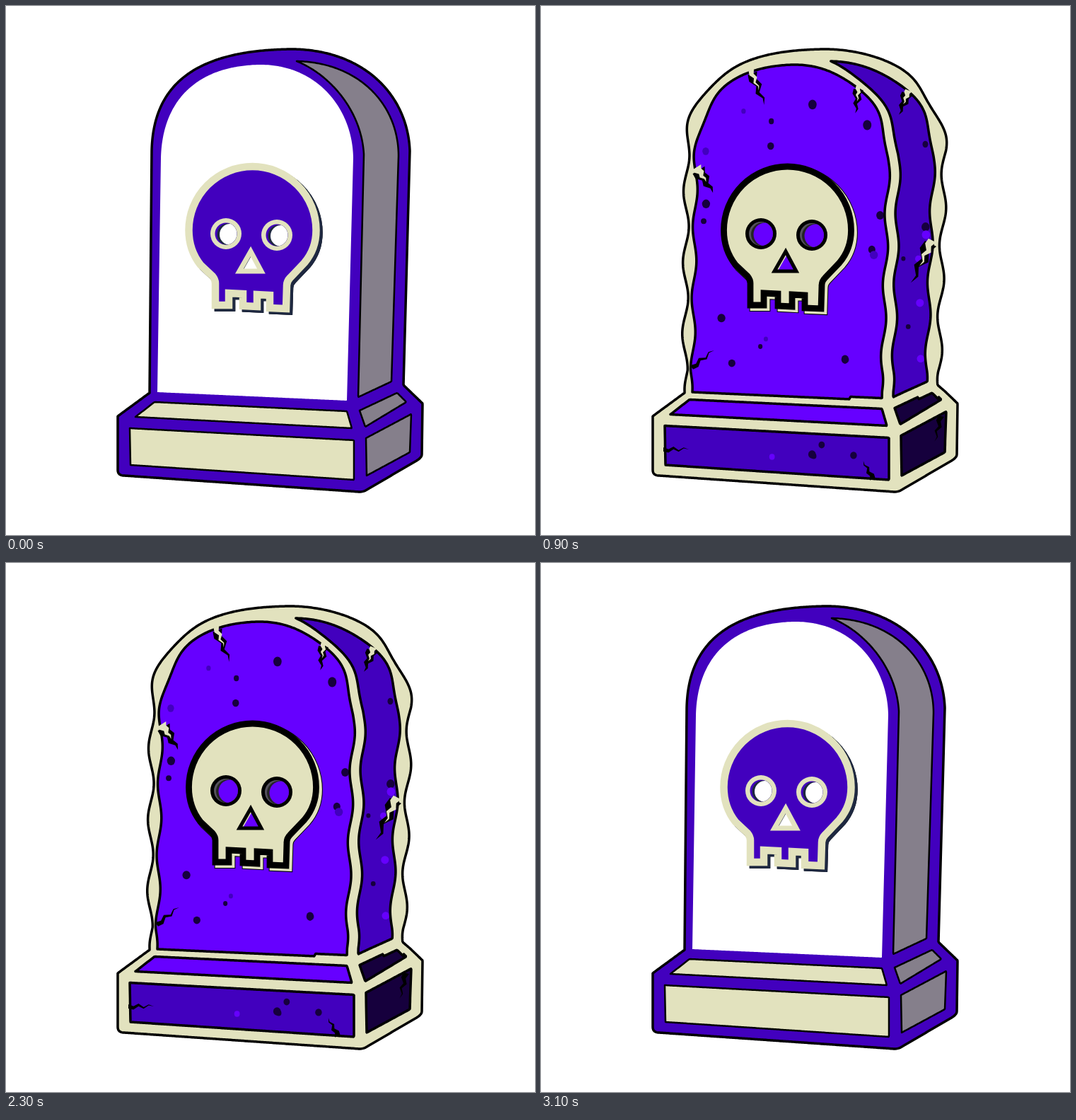
An HTML page with a canvas for the animation above (3.2 s loop, 748 by 748 pixels).

```html
<!DOCTYPE html>
<html lang="en">
<head>
<meta charset="utf-8">
<title>Tombstone</title>
<style>
  html, body { margin: 0; width: 100%; height: 100%; overflow: hidden; background: #fff; }
  canvas { display: block; width: 100vmin; height: 100vmin; }
</style>
</head>
<body>
<canvas id="stage" width="748" height="748"></canvas>
<script>
const ctx = document.getElementById('stage').getContext('2d');
const VIOLET = '#6600ff', BLUE = '#4200be', NIGHT = '#16003d', CREAM = '#e2e2be', GREY = '#857f8b';

// Four key poses (fresh, dull, cracked, mossy) and the steps at which they are reached.
const KEYS = [0, 3, 8, 13];
let pose = 0, part = 0, grown = 0, late = 0;

const lerp = (a, b) => a + (b - a) * part;
const mix = (...v) => lerp(v[pose], v[pose + 1]);
const channels = hex => [1, 3, 5].map(i => parseInt(hex.slice(i, i + 2), 16));
function tint(...v) {
  const to = channels(v[pose + 1]);
  return `rgb(${channels(v[pose]).map((c, i) => Math.round(lerp(c, to[i])))})`;
}

let seed = 11;
const random = (from, to) => {
  seed = seed * 16807 % 2147483647;
  return from + (to - from) * seed / 2147483647;
};

// Closely spaced points along a path, so that it can be warped.
function sample(d) {
  const path = document.createElementNS('http://www.w3.org/2000/svg', 'path');
  path.setAttribute('d', d);
  const length = path.getTotalLength();
  return Array.from({ length: Math.round(length / 2) }, (_, i) => path.getPointAtLength(i * 2));
}

const body = sample('M203 547L206 205C208 112 266 62 405 61C505 62 568 125 571 205L562 536L589 562L588 634Q588 638 582 642L512 683Q506 687 500 687L167 664Q158 664 158 656V580Z');

// Weathering: the walls of the stone become wavy, the panels against the rim.
const wave = (x, y, size) =>
  size * grown * Math.cos((y + 0.07 * x - 427) / 16) * Math.max(0, Math.min(1, (545 - y) / 30));
const bite = (x, y, bx, by, depth) =>
  depth * late * Math.exp(-((x - bx) ** 2 + (y - by) ** 2) / 70);
const rimWarp = ({ x, y }) =>
  [x + wave(x, y, 4) + bite(x, y, 208, 228, 8) + bite(x, y, 530, 112, -7), y];
const panelWarp = ({ x, y }) =>
  [x + wave(x, y, -3), y - (y > 556 && y < 620 ? 3.5 * grown : 0)];

function outline(points, warp) {
  const path = new Path2D();
  for (const p of points) path.lineTo(...warp(p));
  path.closePath();
  return path;
}
function paint(path, fill, stroke, width) {
  if (fill) { ctx.fillStyle = fill; ctx.fill(path); }
  if (width > 0.05) { ctx.strokeStyle = stroke; ctx.lineWidth = width; ctx.stroke(path); }
}
function oval(x, y, rx, ry, fill) {
  const path = new Path2D();
  path.ellipse(x, y, rx, ry, 0, 0, 7);
  paint(path, fill);
}
function inside(path, drawing) {
  ctx.save();
  ctx.clip(path);
  drawing();
  ctx.restore();
}

// Slime comes in from the top (side -1) or the bottom (side 1) with a wavy edge.
function slime(color, side, level, slope, height, length, crest) {
  const path = new Path2D(), shift = side * 90 * (1 - late);
  path.moveTo(150, 374 + side * 374);
  for (let x = 150; x <= 600; x += 3) {
    const ripple = Math.cos((x - crest) / length) + 0.3 * Math.sin(x / 7);
    path.lineTo(x, level + slope * (x - crest) - side * height * ripple + shift);
  }
  path.lineTo(600, 374 + side * 374);
  paint(path, color);
}

// Speckles keep clear of the skull.
function speckles(count, [left, top, width, height], colors, stretch) {
  const list = [];
  while (list.length < count) {
    const x = random(left, left + width), y = random(top, top + height), r = random(3, 6);
    if (Math.hypot(x - 349, y - 325) > 118) list.push([x, y, r, r * random(1, stretch), colors[list.length % colors.length]]);
  }
  return list;
}
function drawSpeckles(list, size) {
  if (size) for (const [x, y, rx, ry, color] of list) oval(x, y, rx * size, ry * size, color);
}

const panel = (d, colors, framed, spots, slimes = () => {}) => ({
  points: sample(d), colors, framed, slimes,
  dust: spots ? speckles(...spots, 1.2) : [],
  moss: spots ? speckles(...spots, 2.3) : []
});
const pale = [CREAM, '#a69abf'], dim = [GREY, '#7e7189'];
const panels = [
  panel('M214 546L219 215C221 130 274 83 362 83C440 84 490 145 491 215L482 558Z',
    ['#ffffff', '#a393c5', VIOLET, VIOLET], false, [17, [230, 130, 250, 390], [NIGHT, NIGHT, BLUE]], () => {
      slime(BLUE, -1, 161, 0.1, 14, 22, 385);
      slime(NIGHT, 1, 546, 0, 20, 30, 288);
    }),
  panel('M411 78C500 80 555 140 555 212L545 531L498 553L506 210C503 150 460 98 411 78Z',
    [...dim, BLUE, BLUE], true, [8, [512, 190, 36, 330], [NIGHT, VIOLET]], () => {
      slime(NIGHT, -1, 202, 0.2, 9, 6, 528);
      slime(NIGHT, 1, 526, -0.3, 8, 9, 545);
    }),
  panel('M183 581L210 560L482 573L489 597Z', [...pale, VIOLET, BLUE], true, null,
    () => slime(NIGHT, -1, 570, 0.02, 5, 18, 270)),
  panel('M500 572L553 547L566 560L508 595Z', [...dim, NIGHT, NIGHT], true),
  panel('M175 597L492 614V670L176 649Z', [...pale, BLUE, VIOLET], true,
    [5, [200, 618, 250, 28], [NIGHT, NIGHT, VIOLET]], () => slime(BLUE, -1, 615, 0.03, 7, 14, 322)),
  panel('M509 611L573 577L571 631L510 664Z', [...dim, NIGHT, BLUE], true, null,
    () => slime(NIGHT, -1, 612, -0.4, 5, 6, 540))
];

function drawPanel({ points, colors, framed, slimes, dust, moss }) {
  const path = outline(points, panelWarp);
  paint(path, tint(...colors));
  inside(path, () => {
    if (late) slimes();
    drawSpeckles(dust, mix(0, 0, 1, 0));
    drawSpeckles(moss, late);
  });
  paint(path, null, '#000', framed ? mix(2.5, 2.5, 3.5, 3.5) : 3.5 * grown);
}

// A jagged wedge from x, y; degrees run clockwise from the right.
function crack(x, y, degrees, length, width, color) {
  const left = [], right = [], steps = 5;
  for (let i = 0; i <= steps; i++) {
    const along = length * i / steps, half = width * (1 - i / steps);
    const zig = i % steps ? (i % 2 ? 1 : -1) * length * 0.06 : 0;
    left.push([along, zig - half]);
    right.unshift([along, zig + half]);
  }
  const turn = degrees * Math.PI / 180, c = Math.cos(turn), s = Math.sin(turn), path = new Path2D();
  for (const [a, b] of [...left, ...right]) path.lineTo(x + a * c - b * s, y + a * s + b * c);
  paint(path, color);
}
// The rim colour runs into the wide end of these cracks.
function spur(x, y, degrees, length, width, color) {
  crack(x, y, degrees, length * grown, (width + 3) * grown, '#000');
  const turn = degrees * Math.PI / 180;
  crack(x - 5 * Math.cos(turn), y - 5 * Math.sin(turn), degrees, length * 0.65 * grown, width * grown, color);
}
function drawCracks(edge) {
  spur(299, 95, 70, 48, 4, edge);
  spur(449, 118, 98, 34, 4, edge);
  spur(223, 232, 58, 38, 7, edge);
  spur(518, 124, 112, 32, 5, edge);
  spur(551, 336, 117, 62, 6, edge);
  crack(213, 511, -37, 40 * grown, 3.5, '#000');
  crack(173, 627, 0, 36 * grown, 3, '#000');
  crack(469, 669, -117, 29 * grown, 4, '#000');
  crack(566, 580, 105, 37 * grown, 4, '#000');
  crack(234, 256, 82, 62 * late, 5, '#000');
  crack(563, 588, 88, 42 * late, 5, '#000');
}

const head = new Path2D('M296 423V392Q296 387 292 382L275 366C264 352 258.5 336 258.5 317A90 90 0 0 1 438.5 317C438.5 336 433 350 422 363L402 384Q397 389 397 395L396 428L373 427V409L355 408V425L335 424V407L315 406V423Z');
const nose = new Path2D('M346 347L330 375H361Z');
const circle = (x, y, r) => {
  const path = new Path2D();
  path.arc(x, y, r, 0, 7);
  return path;
};

function drawSkull(hole) {
  const border = tint(CREAM, '#b0a8ba', '#000000', '#000000');
  const shade = tint('#1e2840', '#2b2e4c', CREAM, '#3f3c48');
  const width = mix(10.5, 10.5, 8.8, 8.8);
  ctx.lineJoin = 'miter';
  ctx.save();
  ctx.translate(4, 3.5);
  paint(head, null, '#000', width + mix(0, 0, 2, 0));
  paint(head, null, shade, width);
  ctx.restore();
  paint(head, tint(BLUE, '#6b3abb', CREAM, GREY), border, width);

  paint(nose, shade);
  inside(nose, () => {
    ctx.translate(4, 1);
    paint(nose, hole);
  });
  paint(nose, null, border, mix(7, 7, 5, 5));

  const inner = mix(15.5, 15.5, 17, 17);
  for (const [x, y] of [[311, 322], [383, 324]]) {
    const socket = circle(x, y, inner);
    paint(circle(x, y, 22), border);
    paint(socket, tint(BLUE, BLUE, '#55525c', '#4c4854'));
    inside(socket, () => {
      paint(circle(x + 3, y + 1, inner), tint('#1e2840', '#2b2e4c', '#242424', '#29272d'));
      paint(circle(x + 6, y + 1, inner - 0.5), hole);
    });
  }
  ctx.lineJoin = 'round';
}

function draw() {
  grown = mix(0, 0, 1, 1);
  late = mix(0, 0, 0, 1);
  const edge = tint(BLUE, '#7f4ae0', CREAM, GREY);
  const bud = mix(0, 1, 0, 0);

  ctx.fillStyle = '#fff';
  ctx.fillRect(0, 0, 748, 748);
  ctx.lineJoin = 'round';
  paint(outline(body, rimWarp), edge, '#000', 3.5);
  panels.forEach(drawPanel);
  oval(295, 97, 4.5 * bud, 4.5 * bud, edge);
  oval(522, 125, 7.5 * bud, 8 * bud, edge);
  if (grown) drawCracks(edge);
  drawSkull(tint(...panels[0].colors));
}

// Steps of 100 ms: forward, hold, then the same way back.
function tick(now) {
  const tenth = Math.floor(now % 3200 / 100);
  const step = Math.max(1, Math.min(14, tenth, 32 - tenth)) - 1;
  pose = step < KEYS[1] ? 0 : step < KEYS[2] ? 1 : 2;
  part = (step - KEYS[pose]) / (KEYS[pose + 1] - KEYS[pose]);
  draw();
  requestAnimationFrame(tick);
}
requestAnimationFrame(tick);
</script>
</body>
</html>
```
